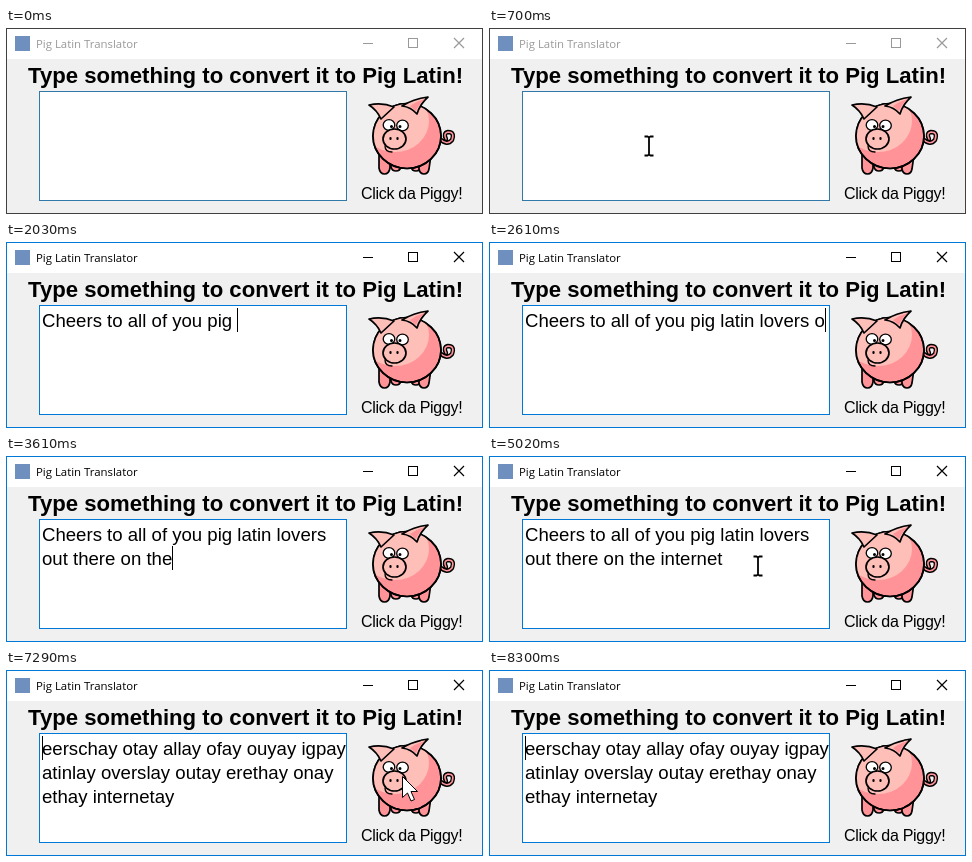
These frames come from a looping animation (477 px wide and 186 px high, 8380 ms). An HTML page:

```html
<!DOCTYPE html>
<html lang="en">
<head>
<meta charset="utf-8">
<title>Pig Latin Translator</title>
<style>
  html, body { margin: 0; width: 477px; height: 186px; overflow: hidden; }
  svg { display: block; }
  text { white-space: pre; font-family: "Liberation Sans", Arial, sans-serif; }
  .crisp { shape-rendering: crispEdges; }
  #frame { fill: #f0f0f0; stroke: #0078d7; }
  #box { fill: #fff; stroke: #0078d7; }
  #bar { fill: #000; stroke: #000; }
  #bar text { font: 11.4px "Open Sans", "Noto Sans", sans-serif; stroke: none; }
  #bar path { fill: none; }
  .idle #frame { stroke: #404040; }
  .idle #box { stroke: #3179a8; }
  .idle #bar { fill: #999; stroke: #999; }
  #lines { font-size: 18.6px; }
  #label { font-size: 16px; letter-spacing: -.3px; }
  #pig { stroke: #000; stroke-width: 1.7; stroke-linejoin: round; stroke-linecap: round; }
  .light { fill: #ffbfb9; }
  .dark { fill: #ff9398; }
  .eye { fill: #fff; stroke-width: 1.3; }
</style>
</head>
<body>
<svg id="stage" width="477" height="186" viewBox="0 0 477 186">
  <defs>
    <clipPath id="belly"><ellipse cx="401" cy="108" rx="34" ry="32.5"/></clipPath>
    <path id="tail" d="M434 111Q441 118 446 112Q449 104 442 104Q437 105 440 111" fill="none"/>
  </defs>
  <rect id="frame" class="crisp" x=".5" y=".5" width="476" height="185"/>
  <rect x="1" y="1" width="475" height="30" fill="#fff"/>
  <rect x="9" y="8" width="15" height="15" fill="#6f8fbf"/>
  <g id="bar">
    <text x="30" y="20">Pig Latin Translator</text>
    <path class="crisp" d="M357 15.5h10M402.5 10.5h9v9h-9z"/>
    <path d="M448 10l10 10M458 10l-10 10" stroke-width="1.2"/>
  </g>
  <text x="22" y="55" font-size="22.15" font-weight="bold">Type something to convert it to Pig Latin!</text>
  <rect id="box" class="crisp" x="33.5" y="63.5" width="307" height="109"/>
  <g id="lines">
    <text x="36" y="85"></text>
    <text x="36" y="109"></text>
    <text x="36" y="133"></text>
  </g>
  <rect id="caret" class="crisp" width="1" height="24"/>

  <g id="pig">
    <use href="#tail" stroke-width="4.4"/>
    <use href="#tail" stroke="#ff9398" stroke-width="1.6"/>
    <path class="dark" d="M385 132v7q1 4 5 4t5-4v-7zM405 132v7q1 4 5 4t4-4v-7z"/>
    <path class="dark" d="M373 126v14q1 6 5.500 6t5.500-6v-10zM413 130v11q1 5 5 5t5-5l2-14z"/>
    <ellipse class="dark" cx="401" cy="108" rx="34" ry="32.5"/>
    <ellipse class="light" cx="389" cy="93" rx="34" ry="31" clip-path="url(#belly)" stroke="none"/>
    <ellipse fill="none" cx="401" cy="108" rx="34" ry="32.5"/>
    <path class="light" d="M375 91Q371 82 363 77Q376 74 388 79z"/>
    <path class="light" d="M396 78Q407 71 422 69Q414 76 411 86Q405 79 396 78z"/>
    <path class="dark" stroke="none" d="M404 78Q411 73 419 71Q413 76 410 83z"/>
    <ellipse class="eye" cx="383" cy="97" rx="5.8" ry="5.4"/>
    <ellipse class="eye" cx="396.5" cy="97.500" rx="5.8" ry="5.4"/>
    <path d="M385.500 98.500v.1M394 98.500v.1" stroke-width="3"/>
    <path d="M379 118Q379 124 386 124" fill="none" stroke-width="1.3"/>
    <ellipse class="light" cx="388.5" cy="111" rx="11.5" ry="10"/>
    <path d="M384.500 110v1M391.500 110v1" stroke-width="2.2"/>
  </g>
  <text id="label" x="355" y="171">Click da Piggy!</text>

  <path id="arrow" d="M.5 .5V21.500L5.500 17L9 25L12.500 23.500L9 15.500H15.500Z" fill="#fff" stroke="#000"/>
  <path id="beam" d="M-4.500-9.500h3l1.500 1 1.500-1h3M0-9V9M-4.500 9.500h3l1.500-1 1.500 1h3" fill="none" stroke="#000" stroke-width="1.8"/>
</svg>
<script>
const LOOP = 8380, FOCUS = 800, TYPED_END = 4490, CONVERT = 6220, BLINK = 519;
const INPUT = "Cheers to all of you pig latin lovers out there on the internet";
const WRAP = INPUT.indexOf("out");
const OUTPUT = ["eerschay otay allay ofay ouyay igpay", "atinlay overslay outay erethay onay", "ethay internetay"];

// [time, characters typed]
const TYPING = [[920, 0], [960, 1], [1480, 14], [1790, 20], [2610, 39], [3510, 53], [4110, 63]];
// [time, x, y]
const PATH = [[100, 400, 178], [700, 160, 118], [4200, 160, 118], [4400, 189, 81], [4700, 314, 86],
  [5000, 269, 110], [5300, 300, 113], [5600, 396, 106], [7200, 396, 106], [7700, 430, 184]];

const $ = id => document.getElementById(id);
const rows = [...document.querySelectorAll("#lines text")];
const show = (el, on) => el.setAttribute("visibility", on ? "visible" : "hidden");

// Linear interpolation between key points, held at both ends
function at(keys, t) {
  const i = keys.findIndex(k => k[0] > t);
  if (i < 1) return keys.at(i).slice(1);
  const a = keys[i - 1], b = keys[i], p = (t - a[0]) / (b[0] - a[0]);
  return a.slice(1).map((v, j) => v + (b[j + 1] - v) * p);
}

function linesAt(t) {
  if (t >= CONVERT) return OUTPUT;
  const n = Math.floor(at(TYPING, t)[0] + 1e-6);
  return n > WRAP + 1 ? [INPUT.slice(0, WRAP), INPUT.slice(WRAP, n)] : [INPUT.slice(0, n)];
}

function drawText(t) {
  const lines = linesAt(t);
  rows.forEach((row, i) => row.textContent = lines[i] || "");
  const last = t < CONVERT ? lines.length - 1 : 0;
  const width = t < CONVERT && lines[last] ? rows[last].getComputedTextLength() : 0;
  $("caret").setAttribute("x", 36 + Math.round(width));
  $("caret").setAttribute("y", 66 + 24 * last);
  const rest = Math.max(0, t - (t < CONVERT ? TYPED_END : CONVERT));
  show($("caret"), t >= FOCUS && Math.floor(rest / BLINK) % 2 === 0);
}

function drawMouse(t) {
  const [x, y] = at(PATH, Math.floor(t / 100) * 100);
  const visible = t >= 100 && t < 960 || t >= 4200 && t < 7750;
  const inBox = x > 33 && x < 341 && y > 63 && y < 173;
  show($("arrow"), visible && !inBox);
  show($("beam"), visible && inBox);
  $(inBox ? "beam" : "arrow").setAttribute("transform", `translate(${x} ${y})`);
}

const start = performance.now();
function draw() {
  const t = (performance.now() - start) % LOOP;
  $("stage").classList.toggle("idle", t < FOCUS);
  drawText(t);
  drawMouse(t);
  requestAnimationFrame(draw);
}
draw();
</script>
</body>
</html>
```
